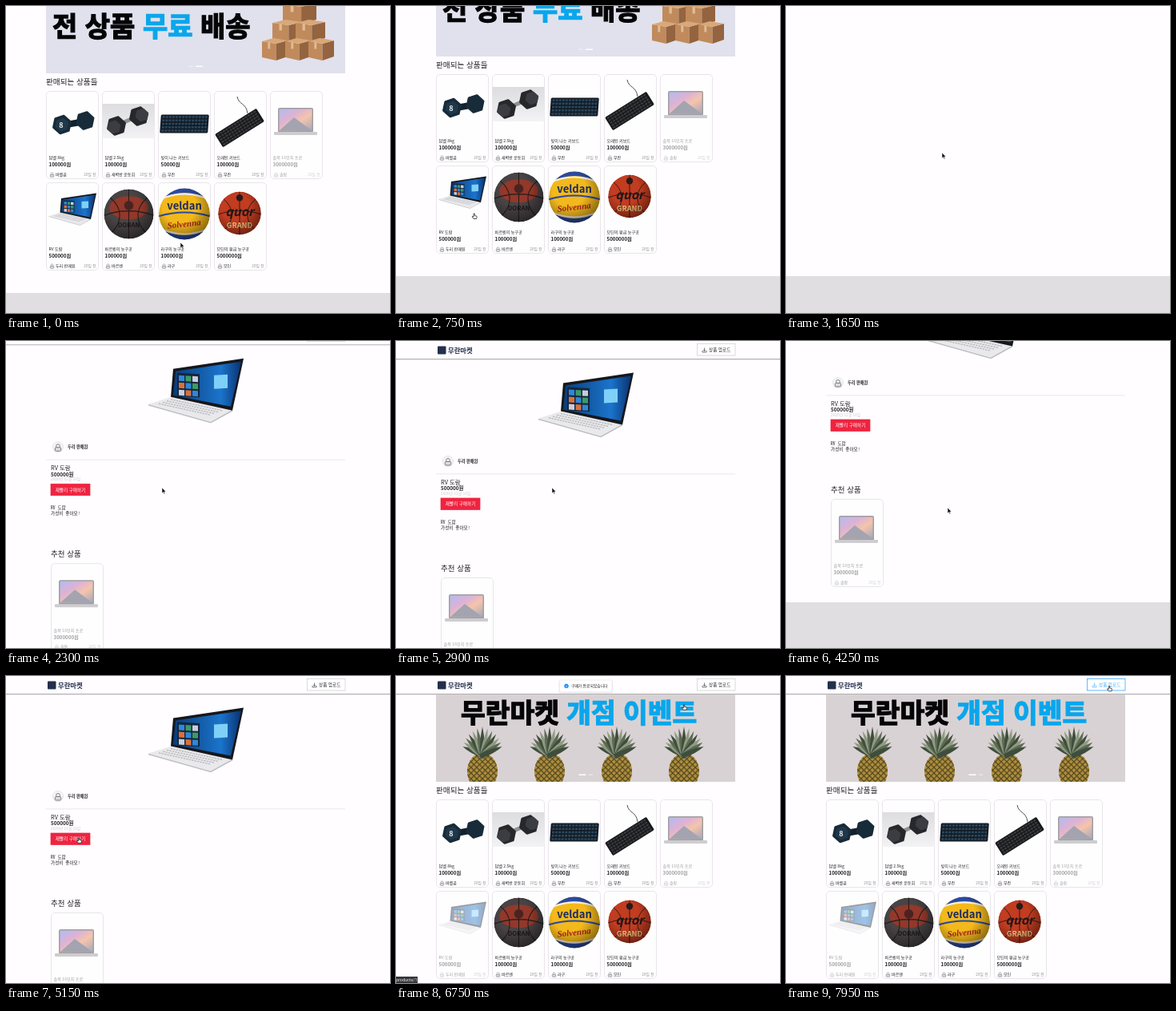
An HTML page for the animation above (8000 ms loop, 480 by 383 pixels).

```html
<!DOCTYPE html>
<html lang="ko">
<head>
<meta charset="utf-8">
<title>무란마켓</title>
<style>
  html, body { margin: 0; width: 100%; height: 100%; overflow: hidden; background: #fffdff; }
  svg { display: block; width: 100vw; height: 100vh; fill: #222226; font-family: "Noto Sans CJK KR", "Noto Sans KR", sans-serif; }
  .mono { font-family: "Noto Sans Mono CJK KR", "DejaVu Sans Mono", monospace; }
</style>
</head>
<body>
<svg id="stage" viewBox="0 0 480 383" preserveAspectRatio="none"></svg>
<script>
const LOOP = 8000;

// SVG helpers
const text = (x, y, size, str, attrs = '') => `<text x="${x}" y="${y}" font-size="${size}" ${attrs}>${str}</text>`;
const rect = (x, y, w, h, fill, attrs = '') =>
  `<rect x="${x}" y="${y}" width="${w}" height="${h}" fill="${fill}" ${attrs}/>`;
const poly = (points, fill) => `<polygon points="${points}" fill="${fill}"/>`;
const line = (d, stroke, width = 1, attrs = '') =>
  `<path d="${d}" fill="none" stroke="${stroke}" stroke-width="${width}" ${attrs}/>`;
const circle = (x, y, r, fill, attrs = '') => `<circle cx="${x}" cy="${y}" r="${r}" fill="${fill}" ${attrs}/>`;
const group = (x, y, body, more = '') => `<g transform="translate(${x} ${y}) ${more}">${body}</g>`;
const repeat = (n, make) => Array.from({ length: n }, (_, i) => make(i)).join('');
const BOLD = 'font-weight="700"', BLACK = 'font-weight="900"', MID = 'text-anchor="middle"';

const defs = `<defs>
  <linearGradient id="wall" x2="1" y2="1"><stop stop-color="#4a63d8"/><stop offset=".35" stop-color="#b04a9c"/>
    <stop offset=".6" stop-color="#e8773a"/><stop offset="1" stop-color="#2c2f63"/></linearGradient>
  <linearGradient id="sky"><stop stop-color="#0b3c78"/><stop offset=".7" stop-color="#1b74cc"/><stop offset="1" stop-color="#0a3270"/></linearGradient>
  <linearGradient id="studio" x2="0" y2="1"><stop stop-color="#dddcde"/><stop offset="1" stop-color="#f3f2f4"/></linearGradient>
  <radialGradient id="shade" cx=".4" cy=".35" r=".65"><stop offset=".5" stop-opacity="0"/><stop offset="1" stop-opacity=".4"/></radialGradient>
  <pattern id="rind" width="5" height="5" patternUnits="userSpaceOnUse" patternTransform="rotate(45)">
    <path d="M0 0H5M0 0V5" stroke="#54481f" stroke-width="2.4"/></pattern>
  <clipPath id="banner"><rect x="50" y="23" width="374" height="109"/></clipPath>
  <clipPath id="ball"><circle r="32"/></clipPath>
</defs>`;

// Product pictures, relative to a card's top left corner
const hexagon = (x, y, r, fill) => group(x, y, `<polygon points="${Array.from({ length: 6 }, (_, i) =>
  [r * Math.sin(i * Math.PI / 3), r * Math.cos(i * Math.PI / 3)].map(v => v.toFixed(1)))}"
  fill="${fill}" stroke="${fill}" stroke-width="3" stroke-linejoin="round"/>`, 'rotate(12)');

const blueDumbbell = line('M20 43L48 38', '#13212d', 8) + hexagon(20, 42, 11, '#182b39') +
  hexagon(49, 37, 10.5, '#182b39') + hexagon(20, 42, 7, '#20384a') +
  text(19, 46, 9, '8', `${BLACK} ${MID} fill="#e8edf0"`);

const steelDumbbell = rect(0.5, 16, 65, 43, 'url(#studio)') + line('M18 43L46 31', '#8f9094', 5) +
  hexagon(18, 43.5, 11, '#27282c') + hexagon(46, 31.5, 11, '#27282c') +
  hexagon(15, 45, 7, '#3c3d42') + hexagon(50, 30, 7, '#3c3d42');

const keyboard = (w, h, body, key) => rect(-w / 2, -h / 2, w, h, body, 'rx="1.500"') + repeat(5, i =>
  line(`M${2 - w / 2} ${(i - 2) * h / 5.4}H${w / 2 - 2}`, key, h / 9, 'stroke-dasharray="3 1.100"'));
const flatKeyboard = group(33, 41, keyboard(60, 23, '#141a23', '#28485f'), 'skewX(-4)');
const tiltedKeyboard = line('M42 28C40 14 31 18 29 7', '#222', 0.8) +
  group(32, 46, keyboard(61, 19, '#17181a', '#3a3c40'), 'rotate(-32)');

const proLaptop = rect(10, 21, 44, 31, '#1c1c20', 'rx="2"') + rect(11.5, 22.5, 41, 27, 'url(#wall)') +
  poly('11.5,49.5 30,33 52.5,49.5', '#262b46') + rect(5, 51, 54, 4, '#8a8a90', 'rx="1"');

// Drawn in a box of 120 by 79
const windowLaptop = poly('29,48 105,64 78,79 0,57', '#e9e8eb') +
  repeat(4, i => line(`M${28 - i * 5} ${51 + i * 1.8}l64 14`, '#b7b8be', 1.3, 'stroke-dasharray="2.500 1"')) +
  line('M0 58L78 80L105 65', '#bcbdc2', 1.5) +
  poly('31,13 119,0 105,65 28,48', '#15171c') + poly('34,16 116,4 103,60 31,46', 'url(#sky)') +
  group(36, 18, rect(0, 0, 28, 29, '#14263f') + repeat(9, i => rect(2 + i % 3 * 8.5, 3 + Math.floor(i / 3) * 9, 7, 7,
    ['#2f87d8', '#3c9a68', '#c9ced8', '#d9703c'][i % 4])), 'skewY(3)') +
  group(82, 21, rect(0, 0, 17, 17, '#7fd0f8'), 'skewY(-3)');

const seams = line('M-32 2C-12-6 12-6 32 2M0-32V32M-24-21C-8-8-8 10-22 24M24-21C8-8 8 10 22 24', '#231a1a', 1.1);
const ball = (x, y, scale, fill, body) => group(x, y,
  `<g clip-path="url(#ball)">${circle(0, 0, 32, fill)}${body}${circle(0, 0, 32, 'url(#shade)')}</g>`, `scale(${scale})`);

const darkBall = ball(33.5, 39.5, 0.97, '#484345',
  '<ellipse cy="-8" rx="25" ry="15" fill="#93382a"/>' + seams + circle(0, -11, 6, '#4a2320') +
  text(0, 17, 8, 'DORAN', `${BLACK} ${MID} fill="#1d1819"`));

const yellowBall = ball(33, 39.5, 1, '#f3b91c',
  [-1, 1].map(s => line(`M-32 ${s * 22}Q0 ${s * 38} 32 ${s * 22}`, '#2b4aa0', 7) +
    line(`M-33 ${s * 17}Q0 ${s * 33} 33 ${s * 17}`, '#f2efe6', 2)).join('') +
  line('M-33 3Q0-7 33 3', '#2b4aa0', 2) +
  text(0, -6, 13, 'veldan', `${BLACK} ${MID} fill="#1d2a5e"`) +
  group(0, 16, text(0, 0, 11, 'Solvenna',
    `${BOLD} ${MID} font-style="italic" font-family="Liberation Serif, serif" fill="#a8241d"`), 'rotate(-6)'));

const orangeBall = ball(32, 38.5, 0.84, '#c23c20', seams + circle(0, -23, 5, '#2a1a18') +
  text(0, 4, 18, 'quor', `${BLACK} ${MID} font-style="italic" fill="#1f1718"`) +
  text(0, 22, 11, 'GRAND', `${BLACK} ${MID} fill="#f1d088"`));

// Cards
const seller = circle(0, -1, 1.5, 'none', 'stroke="#77777c" stroke-width=".6"') +
  rect(-2.3, 0, 4.6, 2.8, '#dddce0', 'rx=".8" stroke="#77777c" stroke-width=".6"');

const card = (x, y, [picture, name, price, owner, id = '', sold]) => group(x, y,
  rect(0.5, 0.5, 65, 109, '#fffeff', 'rx="4.500" stroke="#e2e0e3" stroke-width=".8"') +
  `<g id="${id}" opacity="${sold ? 0.42 : 1}">` + picture +
  text(3.5, 85.3, 5.1, name) + text(3.5, 94.3, 6.2, price + '원', BOLD) + group(7.5, 104.5, seller) +
  text(12, 106.2, 5, owner, 'font-weight="500"') + text(62.5, 106, 4.7, '20일 전', 'text-anchor="end" fill="#909094"') + '</g>');

const smallLaptop = group(3.5, 13.5, windowLaptop, 'scale(.5)');
const pro = [proLaptop, '솔북 16인치 프로', '3000000', '솔람', '', true];
const goods = [
  [blueDumbbell, '덤벨 8kg', '100000', '바벨곰'],
  [steelDumbbell, '덤벨 2.5kg', '100000', '새벽반 운동회'],
  [flatKeyboard, '빛이 나는 키보드', '50000', '무란'],
  [tiltedKeyboard, '오래된 키보드', '100000', '무란'],
  pro,
  [smallLaptop, 'RV 도람', '500000', '두리 판매원', 'bought'],
  [darkBall, '바르멘의 농구공', '100000', '바르멘'],
  [yellowBall, '라구의 농구공', '100000', '라구'],
  [orangeBall, '모딘의 황금 농구공', '5000000', '모딘'],
];

// Banner slides
const greens = ['#3f4d3c', '#8f9a82', '#5c6b52'];
const pineapple = i => group(108 + i * 84, 99,
  ['#b08f3e', 'url(#rind)'].map(f => `<ellipse cy="20" rx="19" ry="23" fill="${f}"/>`).join('') +
  repeat(13, k => `<path d="M-3 3Q-4-16 0-${36 - Math.abs(k - 6) * 1.5}Q4-16 3 3Z" fill="${greens[k % 3]}" transform="rotate(${(k - 6) * 11})"/>`));

const box = (x, y, w, h) => group(x, y,
  poly(`0,0 ${w * 0.55},3 ${w * 0.55},${h} 0,${h - 4}`, '#c08a5c') +
  poly(`${w * 0.55},3 ${w},-1 ${w},${h - 5} ${w * 0.55},${h}`, '#94633f') +
  poly(`0,0 ${w * 0.45},-4 ${w},-1 ${w * 0.55},3`, '#d9a878') + rect(w * 0.23, 1.5, w * 0.09, 8, '#dfbd92'));
const pyramid = repeat(3, r => repeat(r + 1, i => box(346 - 13 * r + 29 * i, 46 + 23 * r, 42 - 5 * r, 24)));

const dots = active => rect(228.5, 122.5, active ? 5 : 9, 1.5, '#fff', `opacity="${active ? 0.4 : 1}"`) +
  rect(active ? 237 : 241, 122.5, active ? 9 : 5, 1.5, '#fff', `opacity="${active ? 1 : 0.4}"`);
const headline = (x, y, size, before, blue, after = '') => `<g fill="#050507" stroke="#050507" stroke-width="1.300">` +
  text(x, y, size, `${before} <tspan fill="#0aa6ec" stroke="#0aa6ec">${blue}</tspan>${after}`, BLACK) + '</g>';

const launchSlide = rect(50, 23, 374, 109, '#d9d2d4') + repeat(4, pineapple) +
  headline(81, 57.5, 33.4, '무란마켓', '개점 이벤트') + dots(0);
const boxSlide = rect(50, 23, 374, 109, '#e0e1ec') + pyramid +
  headline(58, 85.5, 34, '전 상품', '무료', ' 배송') + dots(1);

// Pages
const upload = `<g id="upload">` + rect(376.5, 3.5, 47.5, 14.5, '#fff', 'stroke="currentColor" stroke-width=".8" stroke-opacity=".4" id="uploadBox"') +
  line('M385.500 8.500v4M383.800 11l1.700 1.700l1.700-1.700M383 12v2h5v-2', 'currentColor', 0.6) +
  text(391, 13, 5.6, '상품 업로드', 'fill="currentColor"') + '</g>';
const header = rect(0, 22, 480, 1, '#b2b0b3') + rect(0, 23, 480, 1, '#eeecef') +
  rect(52, 6.5, 10.5, 10, '#22304c', 'rx="1"') + text(65, 14.7, 8.3, '무란마켓', `${BLACK} fill="#1c2a48"`) + upload;

const home = `<g clip-path="url(#banner)"><g id="launch">${launchSlide}</g><g id="boxes">${boxSlide}</g></g>` +
  text(50, 146, 9.6, '판매되는 상품들') +
  goods.map((g, i) => card(50 + (i % 5) * 70, 154 + (i > 4) * 114, g)).join('');

const detail = group(178, 39.5, windowLaptop) +
  circle(65, 150, 6.5, '#f6f5f7', 'stroke="#d4d3d6" stroke-width=".6"') + group(65, 150.5, seller, 'scale(1.600)') +
  text(77, 152, 5.2, '두리 판매원', BOLD) + rect(50, 165.5, 374, 0.8, '#e4e2e5') +
  text(56, 178.7, 7.4, 'RV 도람') + text(56, 186.4, 6.4, '500000원', BOLD) +
  text(56, 191.8, 4.8, '2020년 12월 16일', 'fill="#cccacd"') +
  rect(56, 196, 49, 14.5, '#ee2440', 'id="buyBox" stroke-width=".7"') +
  text(80.5, 205.3, 5.6, '재빨리 구매하기', `${MID} id="buyText"`) +
  text(56, 228, 5.6, 'RV 도람', 'class="mono"') + text(56, 235, 5.6, '가성비 좋아요!', 'class="mono"') +
  text(56, 286.5, 9.5, '추천 상품', 'font-weight="500"') + card(56, 295, pro);

// Fixed layers
const toast = `<g id="toast">` + rect(203.5, 5.5, 67.5, 16, '#000', 'rx="2" opacity=".08"') +
  rect(204.5, 5, 65.5, 15, '#fff', 'rx="1" stroke="#e4e4e8" stroke-width=".6"') +
  circle(213, 12.5, 2.7, '#1890ff') + rect(212.6, 11.8, 0.8, 2.2, '#fff') +
  text(219, 14.3, 4.8, '구매가 완료되었습니다') + '</g>';
const status = `<g id="status">` + rect(0, 375, 27, 8, '#36363a') +
  text(0, 381, 5.4, 'products/1', 'fill="#e8e8ea" font-family="Roboto, sans-serif"') + '</g>';
const cursor = `<g id="cursor"><path id="arrow" d="M0 0V7L1.600 5.600L2.700 8L3.700 7.500L2.700 5.200L4.800 5Z" fill="#111" stroke="#fff" stroke-width=".5"/>
  <path id="hand" transform="scale(.8)" d="M-.8 0Q0-.9.8 0V3L3.800 3.800Q4.500 4.200 4.200 5.400L3.600 8H-.8L-3 5Q-3.300 3.800-2 4.200L-.8 5Z" fill="#fff" stroke="#111" stroke-width=".9"/></g>`;

const stage = document.getElementById('stage');
stage.innerHTML = defs + rect(0, 0, 480, 383, '#fffdff') +
  `<g id="page">${header}<g id="home">${home}</g><g id="detail">${detail}</g>` +
  rect(0, 0, 480, 300, '#e0dee1', 'id="footer"') + '</g>' + status + toast + cursor;
const set = (id, attrs) => { for (const k in attrs) document.getElementById(id).setAttribute(k, attrs[k]); };
const show = (id, on) => set(id, { display: on ? 'inline' : 'none' });

// Motion
const ramp = (t, from, to) => {
  const u = Math.min(1, Math.max(0, (t - from) / (to - from)));
  return u * u * (3 - 2 * u);
};
const pulse = (t, from, to, fade = 200) => ramp(t, from, from + fade) - ramp(t, to, to + fade);
const within = (t, from, to) => t >= from && t < to;

const scrollAt = t => 48 + 21 * ramp(t, 50, 600) - 69 * ramp(t, 1900, 2500) + 98 * pulse(t, 3420, 4350, 540);

// Each move: start, end, x, y
const moves = [
  [350, 850, 84, 255], [1390, 1650, 195, 183], [3500, 4150, 202, 208], [4350, 5050, 91, 202],
  [5450, 6000, 76, 12], [6250, 6750, 360, 36], [6950, 7650, 404, 12.5],
];
const cursorAt = t => moves.reduce(([x, y], [from, to, toX, toY]) => {
  const k = ramp(t, from, to);
  return [x + (toX - x) * k, y + (toY - y) * k];
}, [218, 295]);

function draw(t) {
  const returned = t >= 6150, onDetail = within(t, 1850, 6150);
  const paid = t >= 5600, hover = t >= 7450;
  const shown = pulse(t, 5600, 7200);
  const pointing = within(t, 700, 1200) || within(t, 4900, 5600) || t > 5900;

  set('page', { transform: `translate(0 ${-scrollAt(t)})` });
  show('home', t < 1200 || returned);
  show('detail', onDetail);
  show('launch', returned);
  show('boxes', !returned);
  set('bought', { opacity: returned ? 0.42 : 1 });
  set('footer', { y: onDetail ? 424 : 406 });
  set('buyText', { fill: paid ? '#bfbfbf' : '#fff' });
  set('buyBox', { fill: paid ? '#f5f5f5' : '#ee2440', stroke: paid ? '#d9d9d9' : '#ee2440' });
  set('upload', { color: hover ? '#40a9ff' : '#222226' });
  set('uploadBox', { 'stroke-opacity': hover ? 1 : 0.2 });
  set('toast', { opacity: shown, transform: `translate(0 ${(shown - 1) * 15})` });
  set('status', { opacity: pulse(t, 850, 1420) + pulse(t, 6400, 6950) });
  set('cursor', { transform: `translate(${cursorAt(t)})` });
  show('hand', pointing);
  show('arrow', !pointing);
}

function frame(now) {
  draw(now % LOOP);
  requestAnimationFrame(frame);
}
draw(0);
requestAnimationFrame(frame);
</script>
</body>
</html>
```
